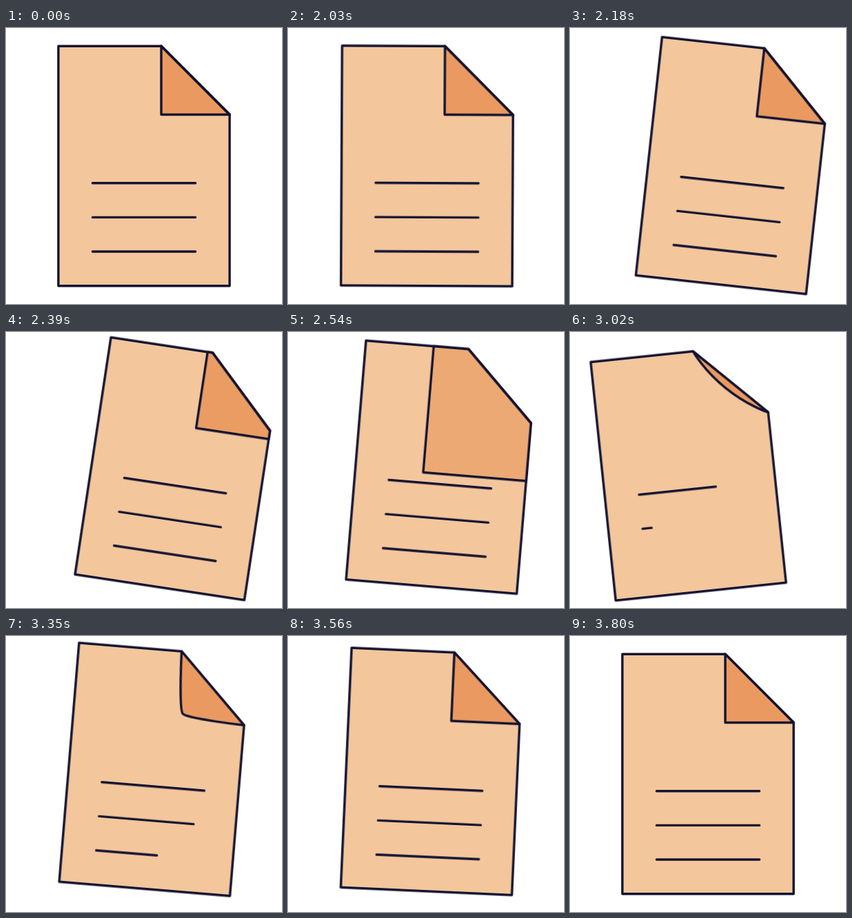
Write an HTML page without scripts that moves like this. It is 400x400 px and loops after 3830 ms.

```html
<!DOCTYPE html>
<html lang="en">
<head>
<meta charset="utf-8">
<title>Turning page</title>
<style>
  :root {
    --page: #f3c69c;
    --fold: #ea9a60;
    --ink: #121331;
    --smooth: cubic-bezier(.333, 0, .667, 1);
  }
  html, body { margin: 0; width: 100%; height: 100%; overflow: hidden; background: #fff; }
  svg { display: block; width: 100vw; height: 100vh; }
  path { stroke: var(--ink); stroke-width: 3.4; stroke-linecap: round; stroke-linejoin: round; fill: none; }
  .page { fill: var(--page); }
  .sheet { fill: var(--fold); }
  .fold { fill: var(--fold); }

  .x, .y, .turn, .old, .sheet, .fold, .new path {
    animation: 3830ms var(--smooth) infinite;
  }
  .x { animation-name: x; }
  .y { animation-name: y; }
  .turn { animation-name: turn; transform-origin: 200px 200px; }
  .old { animation-name: old; }
  .sheet { animation-name: sheet; }
  .fold { animation-name: fold; }
  .new path { stroke-dasharray: 1 2; }
  .new .a { animation-name: write-a; }
  .new .b { animation-name: write-b; }
  .new .c { animation-name: write-c; }

  /* sway of the whole page */
  @keyframes x {
    0% { transform: translateX(0); }
    52.219% { transform: translateX(0); animation-timing-function: cubic-bezier(.333, 0, .6, 1); }
    60.052% { transform: translateX(54.4px); }
    75.718% { transform: translateX(-36.2px); animation-timing-function: cubic-bezier(.39, 0, .667, 1); }
    87.467% { transform: translateX(15.2px); }
    99.217%, 100% { transform: translateX(0); }
  }
  @keyframes y {
    0%, 52.219% { transform: translateY(0); }
    60.052% { transform: translateY(-1px); }
    67.102% { transform: translateY(-4.2px); animation-timing-function: cubic-bezier(.4, 0, .8, .6); }
    75.718% { transform: translateY(.8px); animation-timing-function: cubic-bezier(.3, .6, .6, 1); }
    80.418% { transform: translateY(3.7px); }
    87.467% { transform: translateY(-6.7px); }
    99.217%, 100% { transform: translateY(0); }
  }
  @keyframes turn {
    0% { transform: rotate(0deg); }
    52.219% { transform: rotate(0deg); animation-timing-function: cubic-bezier(.333, 0, .62, 1); }
    60.052% { transform: rotate(9.2deg); animation-timing-function: cubic-bezier(.487, 0, .667, 1); }
    75.718% { transform: rotate(-7.9deg); animation-timing-function: cubic-bezier(.39, 0, .667, 1); }
    87.467% { transform: rotate(4.75deg); }
    99.217%, 100% { transform: rotate(0deg); }
  }

  /* the corner sweeps over the page and becomes the next sheet */
  @keyframes sheet {
    0%, 60.052% {
      d: path("M225 26.2L225 26.2L225 125.5L324.1 125.5L324.1 125.5Z");
      fill: var(--fold);
      animation-timing-function: cubic-bezier(.4, 0, .6, 1);
    }
    75.718%, 100% {
      d: path("M225 26.2L75.9 26.2L75.9 373.8L324.1 373.8L324.1 125.5Z");
      fill: var(--page);
    }
  }
  @keyframes old {
    0%, 75.717% { visibility: visible; }
    75.718%, 100% { visibility: hidden; }
  }

  /* a fresh corner curls out of the diagonal */
  @keyframes fold {
    0%, 74.151% {
      d: path("M225 26.2C225 26.2 239.5 40.8 274.5 75.8C309.5 110.8 324.1 125.5 324.1 125.5Z");
    }
    92.559%, 100% {
      d: path("M225 26.2C225 26.2 225 125.5 225 125.5C225 125.5 324.1 125.5 324.1 125.5Z");
    }
  }

  @keyframes write-a {
    0%, 69.452% { stroke-dashoffset: 1.03; }
    83.316%, 100% { stroke-dashoffset: 0; }
  }
  @keyframes write-b {
    0%, 75.953% { stroke-dashoffset: 1.03; }
    89.817%, 100% { stroke-dashoffset: 0; }
  }
  @keyframes write-c {
    0%, 79.634% { stroke-dashoffset: 1.03; }
    93.42%, 100% { stroke-dashoffset: 0; }
  }
</style>
</head>
<body>
<svg viewBox="0 0 400 400">
  <g class="x"><g class="y"><g class="turn">
    <path class="page" d="M75.9 26.2H225L324.1 125.5V373.8H75.9Z"/>
    <g class="old">
      <path d="M125.5 224.8H274.5M125.5 274.4H274.5M125.5 324H274.5"/>
      <g><path class="sheet" d="M225 26.2L225 26.2L225 125.5L324.1 125.5L324.1 125.5Z"/></g>
    </g>
    <path class="fold" d="M225 26.2C225 26.2 239.5 40.8 274.5 75.8C309.5 110.8 324.1 125.5 324.1 125.5Z"/>
    <g class="new">
      <path class="a" pathLength="1" d="M125.5 224.8H274.5"/>
      <path class="b" pathLength="1" d="M125.5 274.4H274.5"/>
      <path class="c" pathLength="1" d="M125.5 324H274.5"/>
    </g>
  </g></g></g>
</svg>
</body>
</html>
```
